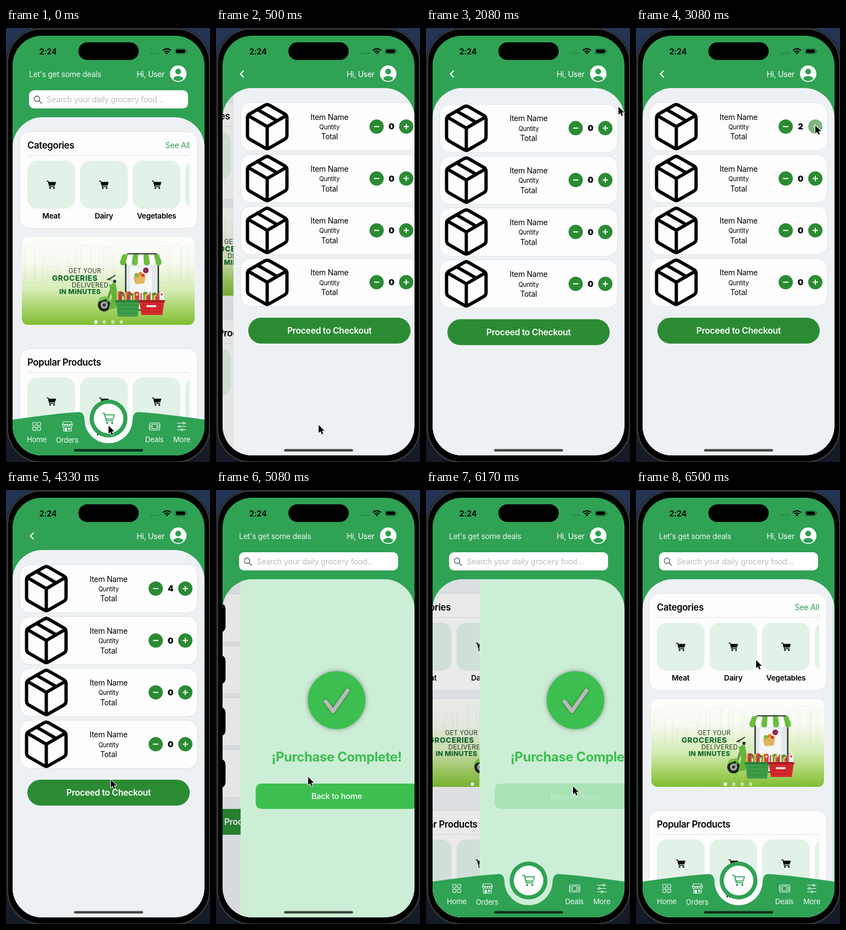
Animation, 372 px wide and 788 px high, one loop 6580 ms. Source, as an HTML page with a canvas:

```html
<!DOCTYPE html>
<html lang="en">
<head>
<meta charset="utf-8">
<title>Grocery app</title>
<style>
html, body { margin: 0; width: 100%; height: 100%; overflow: hidden; background: #000; }
canvas { display: block; width: 372px; height: 788px; }
</style>
</head>
<body>
<canvas id="stage"></canvas>
<script>
const W = 372, H = 788, LOOP = 6580, FPS = 12;
const canvas = document.getElementById('stage');
const c = canvas.getContext('2d');
const dpr = window.devicePixelRatio || 1;
canvas.width = W * dpr;
canvas.height = H * dpr;

const GREEN = '#2fa254', DARK = '#2b8b33', LIME = '#3cbf50', PAGE = '#edf1f4';
const TO_CART = 230, TO_DONE = 4850, TO_HOME = 6111;
const TAPS = [2500, 2920, 3250, 3830];

// Drawing helpers
function rr(x, y, w, h, r, fill, stroke, lw = 1) {
  c.beginPath();
  c.roundRect(x, y, w, h, r);
  if (fill) { c.fillStyle = fill; c.fill(); }
  if (stroke) { c.strokeStyle = stroke; c.lineWidth = lw; c.stroke(); }
}
function disc(x, y, r, fill) {
  c.beginPath();
  c.arc(x, y, r, 0, Math.PI * 2);
  c.fillStyle = fill;
  c.fill();
}
function line(pts, color, lw, close) {
  trace(pts, close);
  c.strokeStyle = color;
  c.lineWidth = lw;
  c.lineCap = c.lineJoin = 'round';
  c.stroke();
}
function poly(pts, fill) {
  trace(pts, true);
  c.fillStyle = fill;
  c.fill();
}
function trace(pts, close) {
  c.beginPath();
  for (let i = 0; i < pts.length; i += 2) c.lineTo(pts[i], pts[i + 1]);
  if (close) c.closePath();
}
function text(s, x, y, size, color, weight = 400, align = 'left', track = -0.02) {
  c.font = `${weight} ${size}px Inter, "Open Sans", sans-serif`;
  c.letterSpacing = `${track * size}px`;
  c.textAlign = align;
  c.fillStyle = color;
  c.fillText(s, x, y + 0.36 * size);
}
function group(x, y, fn, scale = 1, alpha = 1) {
  c.save();
  c.translate(x, y);
  c.scale(scale, scale);
  c.globalAlpha *= alpha;
  fn();
  c.restore();
}
function clipRect(x, y, w, h, r = 0) {
  c.beginPath();
  c.roundRect(x, y, w, h, r);
  c.clip();
}

// Motion helpers
const rest = (t, t0) => {
  const u = Math.max(0, t - t0) * 0.017;
  return (1 + u) * Math.exp(-u);
};
function press(t, t0, hold) {
  if (t < t0) return 1;
  return Math.min(1, 0.25 + 0.75 * Math.max(0, t - t0 - hold) / 250);
}
function bounce(t) {
  const u = Math.max(0, t - 1500) / 110;
  return 40 * u * Math.exp(1 - u);
}
const PATH = [
  [0, 187, 722], [420, 187, 722], [1000, 190, 700], [1500, 192, 679], [1760, 196, 690],
  [2080, 351, 143], [2420, 327, 177], [3920, 327, 177], [4330, 191, 526], [4450, 186, 545],
  [4800, 184, 547], [5080, 168, 521], [5330, 172, 545], [5800, 262, 556], [6000, 268, 552],
  [6170, 268, 538], [6500, 219, 309], [6580, 218, 308]
];
function pointer(t) {
  const i = Math.max(1, PATH.findIndex(p => p[0] > t));
  const [t0, x0, y0] = PATH[i - 1], [t1, x1, y1] = PATH[i];
  const u = (t - t0) / (t1 - t0), e = u * u * (3 - 2 * u);
  return [x0 + (x1 - x0) * e, y0 + (y1 - y0) * e];
}

// Icons
function cart(x, y, color, scale, outline) {
  group(x, y, () => {
    line([-8, -6.5, -5.5, -6.5, -3, 3.5, 6, 3.5], color, 1.3);
    const basket = [-5, -4.5, 8, -4.5, 6.3, 1, -3.7, 1];
    if (!outline) poly(basket, color);
    line(basket, color, 1.2, true);
    disc(-2, 6.3, 1.5, color);
    disc(5, 6.3, 1.5, color);
  }, scale);
}
const cube = new Path2D('M21 16V8a2 2 0 0 0-1-1.73l-7-4a2 2 0 0 0-2 0l-7 4A2 2 0 0 0 3 8v8' +
  'a2 2 0 0 0 1 1.73l7 4a2 2 0 0 0 2 0l7-4A2 2 0 0 0 21 16z' +
  'M3.27 6.96L12 12.01l8.73-5.05M12 22.08V12M7.5 4.21l9 5.19');
function box(x, y) {
  group(x - 48, y - 48, () => {
    c.strokeStyle = '#000';
    c.lineWidth = 1.5;
    c.lineCap = c.lineJoin = 'round';
    c.stroke(cube);
  }, 4);
}

// Home page
function tiles(y, labels) {
  c.save();
  clipRect(39, y - 2, 296, 120);
  for (let i = 0; i < 4; i++) {
    const x = 39 + 96 * i;
    rr(x, y, 87, 87, 18, '#e2f2e7');
    cart(x + 43.5, y + 43.5, '#000', 1);
    text(labels[i] || '', x + 43.5, y + 100.5, 13.7, '#000', 600, 'center');
  }
  c.restore();
}
function card(y, h, title) {
  rr(25, y, 324, h, 19, '#fdfdfd', '#dce1e4');
  text(title, 39, y + 24.5, 16.8, '#000', 600);
  rr(39, y + 43, 296, 1, 0, '#dfe1e2');
}
function skyline() {
  for (let i = 0; i < 15; i++) {
    const h = 24 + 46 * Math.abs(Math.sin(i * 2.7 + 1));
    const x = 34 + i * 20.5, w = 11 + 7 * Math.abs(Math.cos(i * 1.9));
    rr(x, 462 - h, w, h, 0, null, 'rgba(150,175,125,.17)', 0.8);
  }
}
function shopPhone() {
  rr(217, 409, 62, 104, 7, '#27352d');
  rr(219.5, 411, 57, 100, 5, '#e3e9ea');
  rr(226, 433, 40, 52, 2, '#f5f7f7');
  for (let i = 0; i < 7; i++) {
    const x = 208 + i * 10.8, col = i % 2 ? '#fff' : '#69bd3c';
    poly([213 + i * 9.4, 411, 222.4 + i * 9.4, 411, x + 10.8, 424, x, 424], col);
    rr(x, 423, 10.8, 8, [0, 0, 5, 5], col);
  }
  disc(255, 440, 5.2, '#8e2a55');
  poly([232, 452, 255, 450, 252, 464, 236, 465], '#e3b45c');
  disc(238, 449, 4, '#7fb93c');
  disc(245, 447, 4, '#e88b35');
  disc(250, 449, 3, '#cf4434');
}
function scooter() {
  disc(179, 503, 11.5, '#20251f');
  disc(179, 503, 6.5, '#a9b2a8');
  disc(179, 503, 3, '#333');
  line([189, 456, 193, 470, 184, 498], '#4f9f35', 4);
  line([185, 457, 193, 453, 199, 449], '#2c3a2a', 2);
  poly([187, 461, 200, 464, 204, 490, 200, 509, 187, 511, 193, 488], '#65b33d');
  poly([167, 498, 172, 489, 183, 487, 192, 497, 182, 492], '#77c348');
  disc(190, 462, 4, '#d9e9cf');
  disc(198, 460, 3, '#333');
}
function basket(x, y, w, h, color, rim, seed) {
  const goods = ['#d8423a', '#f1c84a', '#5aa83a', '#f3f1ea', '#c9566b', '#8a4a3a'];
  for (let i = 0; i < 14; i++) {
    const gx = x + 2 + i * (w - 11) / 13, gy = y - 6 - 11 * Math.abs(Math.sin(i * 3.7 + seed));
    rr(gx, gy, 8, y - gy + 4, 3, goods[(i * 5 + seed) % 6]);
    disc(gx + 4, gy + 5, 2, goods[(i * 5 + seed + 3) % 6]);
  }
  poly([x, y, x + w, y, x + w - 4, y + h, x + 4, y + h], color);
  rr(x - 1, y - 1, w + 2, 4, 2, rim);
  for (let i = 1; i < 4; i++) line([x + 6, y + i * h / 4 + 1, x + w - 6, y + i * h / 4 + 1], rim, 0.8);
}
function banner() {
  c.save();
  clipRect(29, 380, 315, 159, 11);
  const g = c.createLinearGradient(0, 380, 0, 539);
  g.addColorStop(0, '#fdfefc');
  g.addColorStop(0.3, '#f5faef');
  g.addColorStop(0.6, '#d6ecb6');
  g.addColorStop(0.85, '#a0cf5e');
  g.addColorStop(1, '#80bd33');
  c.fillStyle = g;
  c.fillRect(29, 380, 315, 159);
  skyline();
  text('GET YOUR', 114, 441, 11.4, '#26382a', 400, 'left', 0.02);
  text('GROCERIES', 84, 454, 13.6, '#116a2e', 800, 'left', 0.04);
  text('DELIVERED', 120, 466.5, 11.8, '#26382a', 400, 'left', 0.03);
  text('IN MINUTES', 97, 479, 12.2, '#116a2e', 800, 'left', 0.03);
  shopPhone();
  scooter();
  basket(200, 495, 44, 29, '#3d9d48', '#2a7f38', 1);
  basket(243, 495, 46, 26, '#d5282c', '#a81c22', 4);
  rr(256, 503, 18, 4, 1, '#f0d5d3');
  for (let i = 0; i < 4; i++) disc(164 + i * 15.4, 534, 3.2, i ? 'rgba(255,255,255,.55)' : '#fff');
  c.restore();
}
function home() {
  c.fillStyle = PAGE;
  c.fillRect(12, 100, 350, 760);
  card(188, 176, 'Categories');
  text('See All', 335, 212.5, 14.3, GREEN, 400, 'right');
  tiles(241, ['Meat', 'Dairy', 'Vegetables']);
  banner();
  card(582, 260, 'Popular Products');
  tiles(634.5, ['Bread', 'Milk', 'Fruit']);
}

// Cart page
function cartPage(t) {
  c.fillStyle = PAGE;
  c.fillRect(12, 50, 350, 780);
  c.save();
  c.translate(0, bounce(t));
  const last = TAPS.filter(p => p <= t).pop();
  const count = TAPS.filter(p => p + 80 <= t).length;
  for (let i = 0; i < 4; i++) {
    const y = 179 + 94.2 * i;
    rr(25, y - 43.5, 324, 87.5, 19, '#fdfdfd', '#dce1e4');
    box(73.5, y);
    text('Item Name', 187, y - 17.5, 14, '#000', 400, 'center');
    text('Quntity', 187, y + 1, 11.3, '#000', 400, 'center');
    text('Total', 187, y + 18.5, 13.8, '#000', 400, 'center');
    disc(273, y, 13, DARK);
    line([269, y, 277, y], '#fff', 2);
    group(327, y, () => {
      disc(0, 0, 13, DARK);
      line([-4, 0, 4, 0], '#fff', 2);
      line([0, -4, 0, 4], '#fff', 2);
    }, 1, i || !last ? 1 : press(t, last, 40));
    text(i ? '0' : String(count), 300, y, 15, '#000', 900, 'center');
  }
  group(187, 549.5, () => {
    rr(-148, -23.5, 296, 47, 23.5, DARK);
    text('Proceed to Checkout', 0, 0, 15.8, '#fff', 600, 'center');
  }, 1, press(t, 4580, 80));
  c.restore();
}

// Confirmation page
function donePage(t) {
  c.fillStyle = '#cdeed6';
  c.fillRect(12, 100, 350, 700);
  c.save();
  c.shadowColor = 'rgba(0,0,0,.4)';
  c.shadowBlur = 8 * dpr;
  disc(187, 381.5, 52.5, LIME);
  c.shadowBlur = 4 * dpr;
  line([167, 384, 180.5, 401.5, 207, 364], '#bababa', 7);
  c.restore();
  text('¡Purchase Complete!', 187, 484, 24.1, LIME, 700, 'center');
  group(187, 556, () => {
    rr(-147.5, -23, 295, 46, 10, LIME);
    text('Back to home', 0, 0, 14.7, '#fff', 500, 'center');
  }, 1, press(t, 6000, 250));
}

// Fixed chrome
function header(tall) {
  c.fillStyle = GREEN;
  c.fillRect(12, 14, 350, 210);
  text('2:24', 76.5, 42.5, 15, '#000', 600, 'center');
  rr(132, 26, 110, 32, 16, '#000');
  for (let i = 0; i < 4; i++) disc(265 + i * 4.3, 46, 1.2, '#217a3e');
  for (const r of [3, 7, 11]) {
    c.beginPath();
    c.arc(293.5, 48, r - 0.8, -Math.PI * 0.75, -Math.PI * 0.25);
    c.strokeStyle = '#000';
    c.lineWidth = r === 3 ? 3 : 2;
    c.lineCap = 'butt';
    c.stroke();
  }
  rr(308.5, 37.5, 19.5, 9.5, 3, null, '#1d6635');
  rr(310, 39, 16.5, 6.5, 2, '#000');
  rr(329, 40.5, 1.5, 3.5, 1, '#1d6635');
  text('Hi, User', 289, 84, 14, '#fff', 400, 'right');
  disc(314, 83, 15, '#fff');
  c.save();
  c.beginPath();
  c.arc(314, 83, 13.2, 0, 7);
  c.clip();
  disc(314, 79, 5.3, GREEN);
  c.beginPath();
  c.ellipse(314, 95, 10, 8, 0, 0, 7);
  c.fill();
  c.restore();
  if (!tall) return line([50, 78, 44.5, 83.5, 50, 89], '#fff', 2.2);
  text("Let's get some deals", 42, 84, 14, '#eaf7ee');
  rr(42, 113, 290, 33, 9, '#fff');
  c.beginPath();
  c.arc(56.5, 128.5, 5, 0, 7);
  c.strokeStyle = '#555';
  c.lineWidth = 1.3;
  c.stroke();
  line([60.3, 132.3, 65, 137], '#555', 1.4);
  text('Search your daily grocery food...', 74, 130, 14.4, '#bcbec0');
}
function tabBar(t) {
  c.beginPath();
  c.moveTo(12, 711);
  c.quadraticCurveTo(90, 700, 130, 697.5);
  c.quadraticCurveTo(142, 696, 143, 710);
  c.arc(187, 710, 44, Math.PI, 0, true);
  c.quadraticCurveTo(232, 696, 244, 697.5);
  c.quadraticCurveTo(284, 700, 362, 711);
  c.lineTo(362, 780);
  c.lineTo(12, 780);
  c.fillStyle = GREEN;
  c.fill();
  const white = '#f2fbf5';
  for (let i = 0; i < 4; i++) rr(48.7 + (i % 2) * 8.6, 716 + (i >> 1) * 8.6, 6, 6, 1, null, white, 1.1);
  // storefront
  line([105, 715, 119, 715, 121, 720, 103, 720], white, 1.2, true);
  for (let i = 0; i < 4; i++) rr(103 + i * 4.5, 720, 4.5, 3.5, [0, 0, 2, 2], null, white);
  line([105, 724, 105, 732, 119, 732, 119, 724], white, 1.2);
  rr(107, 726, 4, 6, 0, white);
  rr(113, 726, 4, 3.5, 0, white);
  // ticket
  rr(261.5, 717, 19, 13, 3, null, white, 1.2);
  rr(266.5, 719.5, 9, 8, 1, null, white, 1.2);
  for (const x of [264, 278]) line([x, 720, x, 727], white, 1);
  // sliders
  [324, 316, 321].forEach((x, i) => {
    const y = 717.5 + i * 6;
    line([312.5, y, 328.5, y], white, 1.1);
    disc(x, y, 2.2, white);
    disc(x, y, 1.1, GREEN);
  });
  text('Home', 56, 747, 13.2, white, 400, 'center');
  text('Orders', 111.5, 748, 13.2, white, 400, 'center');
  text('Deals', 270.5, 747, 13.2, white, 400, 'center');
  text('More', 320.5, 747, 13.2, white, 400, 'center');
  disc(187, 709, 34.5, GREEN);
  disc(187, 709, 27, '#fff');
  group(187, 708.5, () => cart(0, 0, GREEN, 1.35, true), 1, t < TO_CART ? press(t, 80, 90) : 1);
}
function bezel() {
  const g = c.createLinearGradient(0, 0, 0, H);
  g.addColorStop(0, '#233553');
  g.addColorStop(1, '#141a26');
  c.fillStyle = g;
  c.fillRect(0, 0, W, H);
  rr(0, 0, 374, 790, 64, '#1e2023');
  rr(3, 2, 368, 786, 61, '#000', '#45484b', 1.5);
}
function arrow(x, y) {
  group(x, y, () => {
    const p = [0, 0, 0, 14.5, 3.4, 11.4, 5.8, 16.8, 8.2, 15.8, 5.9, 10.5, 10.5, 10.3];
    line(p, '#fff', 2, true);
    poly(p, '#000');
  });
}

// The lower page trails at 30% and darkens as the upper one covers it.
function stack(lower, upper, x) {
  const cover = 1 - x / 350;
  group(-105 * cover, 0, lower);
  c.fillStyle = `rgba(0,0,0,${0.1 * cover})`;
  c.fillRect(12, 100, 350, 700);
  group(x, 0, upper);
}
function pages(t, top) {
  const showHome = () => group(0, top - 162, home);
  const showCart = () => group(0, top - 109, () => cartPage(t));
  const showDone = () => donePage(t);
  if (t < TO_CART) showHome();
  else if (t < TO_DONE) stack(showHome, showCart, 350 * rest(t, TO_CART));
  else if (t < TO_HOME) stack(showCart, showDone, 350 * rest(t, TO_DONE));
  else stack(showHome, showDone, 350 * (1 - rest(t, TO_HOME)));
}
function draw(t) {
  c.setTransform(dpr, 0, 0, dpr, 0, 0);
  bezel();
  const tall = t < TO_CART || t >= TO_DONE, top = tall ? 162 : 109;
  c.save();
  clipRect(12, 14, 350, 762, 54);
  header(tall);
  c.save();
  clipRect(12, top, 350, 700, [55, 55, 0, 0]);
  pages(t, top);
  c.restore();
  if (t < TO_CART || t >= TO_HOME) tabBar(t);
  rr(124, 764.5, 126, 4.5, 2.2, 'rgba(0,0,0,.7)');
  c.restore();
  arrow(...pointer(t));
}

// The screen updates in steps of a twelfth of a second.
const start = performance.now();
function tick() {
  const t = (performance.now() - start) % LOOP;
  draw(Math.floor((t + 5) * FPS / 1000) * 1000 / FPS % LOOP);
  requestAnimationFrame(tick);
}
tick();
</script>
</body>
</html>
```
